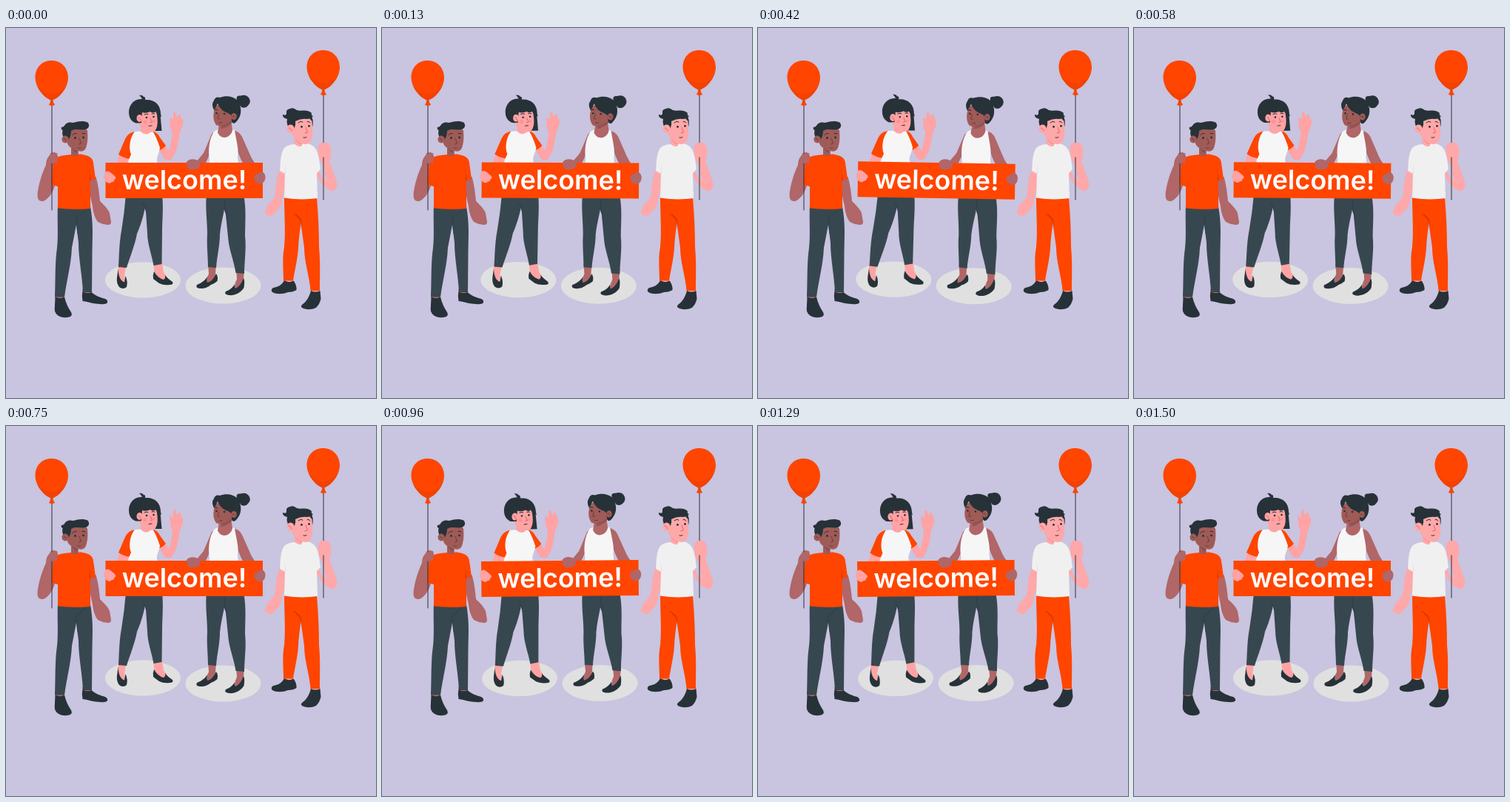
An HTML page that plays this animation: 500x500 px, repeating every 1.54 s.

```html
<!DOCTYPE html>
<html lang="en">
<head>
<meta charset="utf-8">
<title>Welcome</title>
<style>
  html, body { margin: 0; width: 100%; height: 100%; overflow: hidden; background: #c9c4df; }
  svg { display: block; width: 100%; height: 100%; }
  .orange { fill: #ff4500; }
  .ink { fill: #263238; }
  .slate { fill: #37474f; }
  .pink { fill: #ffa3a4; }
  .rose { fill: #ffa8a9; }
  .brown { fill: #9f5b57; }
  .tan { fill: #b16668; }
  .white { fill: #f6f6f6; }
  .pale { fill: #f0f0f0; }
  .shadow { fill: #e0e0e0; }
  .shade { fill: #000; opacity: .16; }
  .tint { fill: #000; opacity: .05; }
  .line { fill: none; stroke: #263238; stroke-width: 1; stroke-linecap: round; }
  .crease { fill: none; stroke: #263238; stroke-width: .8; opacity: .55; }
  .nose { fill: none; stroke: #ed6068; stroke-width: 1; stroke-linecap: round; }
  .dusk { fill: none; stroke: #6f3b3b; stroke-width: 1; stroke-linecap: round; }
  .blush { fill: #ff6b76; opacity: .3; }
  text { font: 600 36px Inter, "Open Sans", sans-serif; fill: #fff; text-anchor: middle; }
</style>
</head>
<body>
<svg viewBox="0 0 500 500">
  <defs>
    <g id="balloon">
      <path class="line" d="M62 103V246"/>
      <path class="orange" d="M61.500 44C75 44 84 54 84 67C84 81 72 95 62.500 97.500L66 104Q62 106 58 104L61 97.500C52 95 39.500 81 39.500 67C39.500 54 48 44 61.500 44Z"/>
      <path class="tint" d="M41 76C52 93 73 93 83 75C79 87 70 95 62.500 97.500H61C53 95 44 86 41 76Z"/>
      <path class="shade" d="M59 97Q62 98 65 96.500L64 99.500H60Z"/>
    </g>
  </defs>

  <!-- man on the left -->
  <g>
    <path class="tan" d="M103 353H116L115.500 360H104ZM66.500 360H79V368H67Z"/>
    <path class="ink" d="M103.500 356Q109 360 115.500 357C121 362 127 364 134 366Q138 368 137 371Q135 374 127 373C118 373 112 370 103.500 369Q102 362 103.500 356Z"/>
    <path class="ink" d="M66.500 363.500Q73 367 79 363.500C81 372 84 378 88 384Q91 390 83 391Q76 392 71 389C64 384 66 379 66 374Z"/>
    <path class="slate" d="M84 241H114C118 264 117 280 116.500 300L116 357H104C103 334 98 312 98 290L94 258Z"/>
    <path class="slate" d="M70 238H113L97 256C94 270 92 282 89 297C88 320 82 340 79 363.500H66C67 340 66 318 69 297C71 280 69 258 70 238Z"/>
    <path class="crease" d="M106 246Q101 254 94.500 257L97 279"/>
    <path class="tan" d="M112 203L121.500 201C125 213 126 224 127 234C132 239 137 243 140 250L142 262Q142 266 138 266L131 265L124 262Q118 254 117 241C114 229 112 217 112 203Z"/>
    <path class="orange" d="M89 171L101 170.500C112 172 117 175 118 182L121 204L114 206V244Q92 246 70 243.500V214L62 212C62 197 62 184 67 176Q71 172 89 171Z"/>
    <path class="shade" d="M112.500 188L114.500 206L113 207Z"/>
    <path class="tan" d="M59 172Q60 168 65 168Q70 169 70 174L69 182L65 198L62 212L66 213C63 223 57 232 50 234Q42 235 42.500 225C44 210 49 196 54 185Q54 177 59 172Z"/>
    <path class="orange" d="M65 181C62 191 62 202 61.500 212L71 214L73 185Z"/>
    <path class="brown" d="M82 139C89 132 106 131 110 139C111 149 110 158 107 164Q104 168 97 166L98 171Q94 176 88 171.500V162C82 159 80 149 82 139Z"/>
    <path class="shade" d="M89 162Q93 166 97.500 166L97.500 169Q92 168 89 162Z"/>
    <path class="ink" d="M80 152Q75 145 76.500 138Q74 137 75 134Q78 134 79 132Q82 126 91 128C98 126 105 125 111 128Q114 134 109 136.500C102 139 95 135 88 139Q88 146 85 150Z"/>
    <ellipse class="brown" cx="80" cy="150.500" rx="4.600" ry="5"/>
    <path class="dusk" d="M78 149Q80 149 81 152M99 149L101.500 156L98.500 157M97 162H101"/>
    <circle class="ink" cx="93.500" cy="148.500" r="1.400"/>
    <circle class="ink" cx="104.500" cy="148" r="1.400"/>
    <path class="line" d="M90 144.500Q92 142 95 142.500M103 142.500Q105 141.500 107 143"/>
  </g>
  <use href="#balloon"/>
  <path class="tan" d="M58 174Q62 168 69 169Q70 172 67 175L68 181Q64 184 58 182Z"/>

  <!-- man on the right -->
  <g>
    <path class="rose" d="M376 337H388V346H376ZM411.500 350H424V360H412Z"/>
    <path class="ink" d="M376 341Q382 345 388.500 341.500Q393 347 392.500 354Q388 357 381 357C374 360 365 360 360 357Q357 354 361 351C368 350 373 347 376 341Z"/>
    <path class="ink" d="M412 355Q418 358 424.500 355L425.500 366Q424 373 419 378Q411 382 402 379Q397 377 400 374C406 370 410 363 412 355Z"/>
    <path class="orange" d="M376 229H405C400 255 396 276 395 297C394 313 390 328 388 341.500H375C375 326 373 311 376 296C378 275 376 252 376 229Z"/>
    <path class="orange" d="M382 229H420C422 253 423 275 423 296C425 317 424 336 424 355H411.500C410 334 403 317 403 297L397 253Z"/>
    <path class="shade" d="M388 250Q395 252 399 259L400 274L397 259Z"/>
    <path class="rose" d="M370 190L381 193C380 207 377 219 373 230Q373 240 367 246L360 253Q355 256 350 250Q349 247 352 244Q351 241 355 238L363 229C364 215 366 202 370 190Z"/>
    <path class="rose" d="M420 190L430 207L432 205L428 184Q421 176 422 163Q423 156 427 155Q435 153 438 160Q441 169 437 180L447 208Q449 219 441 220Q430 220 417 193Z"/>
    <path class="pale" d="M389 157L407 156C417 158 421 165 423 177L425 191L420 196L421 230Q399 233 376 229.500L377 197L370 193C371 180 371 169 376 162Q380 158 389 157Z"/>
    <path class="tint" d="M377 184L378.500 197L376.500 197Z"/>
    <path class="rose" d="M386 121C395 117 409 118 413 125C415 137 415 148 411 154Q407 159 400 156L400 159Q397 162 390 157V149C384 143 383 131 386 121Z"/>
    <path class="blush" d="M391 149Q395 155 400 156V158Q392 156 391 149Z"/>
    <path class="ink" d="M385 139Q378 130 380 123Q373 121 374 117Q379 119 379 115Q378 110 384 109Q388 107 393 111C400 113 407 109 413 115Q412 118 415 119Q412 123 406 123Q399 122 391 126Q392 133 388 137Z"/>
    <path class="ink" d="M409 121L413.500 126L414 134Q416 125 413 120Z"/>
    <ellipse class="rose" cx="384.500" cy="136" rx="5" ry="5.500"/>
    <path class="nose" d="M382 135Q385 135 386 139M405 134L407.500 141L404 142"/>
    <path class="line" d="M402 148Q404 149 406 147.500M395 128Q398 125 401 127M407 126.500Q409 125.500 411 128"/>
    <circle class="ink" cx="399.500" cy="133.500" r="1.400"/>
    <circle class="ink" cx="409.500" cy="132.500" r="1.400"/>
  </g>
  <use href="#balloon" x="367" y="-14"/>
  <path class="rose" d="M422 160Q427 153 434 156Q438 159 437 162L432 165L436 171Q433 176 427 174L423 169Z"/>

  <g id="group">
    <ellipse class="shadow" cx="185" cy="340.500" rx="51" ry="24.200"/>
    <ellipse class="shadow" cx="293.500" cy="348" rx="51" ry="24.500"/>

    <!-- woman with the bob -->
    <g>
      <path class="pink" d="M152 318H163L160 334L162 346H153L151 331ZM199 315H210.500L213 330L221 342L210 344L201 337Z"/>
      <path class="ink" d="M151.500 326C152 336 155 342 160 343.500Q161 338 161.500 335Q165 343 163 350Q158 354 153 350Q149 345 150 337Z"/>
      <path class="ink" d="M200 329Q205 338 213 340Q216 338 215 334C218 338 221 340 225 343Q227 347 221 347Q213 348 207 345L199 339Q198 334 200 329Z"/>
      <path class="slate" d="M162 225H191C188 246 184 262 177 278C174 294 168 308 163 324L152 323C153 306 153 290 156 274Q160 250 162 225Z"/>
      <path class="slate" d="M181 225H211C213 244 211 260 211 277L210.500 319L199.500 321C197 306 191 292 191 277L189 248Z"/>
      <path class="crease" d="M184 236Q188 240 190 250"/>
      <path class="pink" d="M154 169L168 174Q164 184 157 190L141 202L135 196L149 185Z"/>
      <path class="pink" d="M205 160L214 158L220 166C223 157 224 149 225 141Q221 134 222 128Q220 123 223 121L226 125L226 116Q227 112 229 114L231 120L234 117Q237 116 236 121L238 123Q241 128 237 136L234 144C233 157 230 169 224 177Q218 181 213 175Z"/>
      <path class="orange" d="M175 140Q165 141 161 150L152 171Q159 176 168 177L176 160ZM197 139Q205 141 208 148L216 159Q212 164 205 166L197 156Z"/>
      <path class="white" d="M174 140L198 139C202 145 206 155 208 162C207 169 203 174 204 180L205 186H164Q165 178 169 171C165 161 168 147 174 140Z"/>
      <path class="pink" d="M183 130L195 136L196 140Q190 147 182 140Z"/>
      <path class="ink" d="M197 112L208 111L210.500 139H200Z"/>
      <path class="pink" d="M180 112H203C205 122 206 132 202 138Q199 142 191 140Q181 137 180 128Z"/>
      <path class="ink" d="M184 96Q182 92 180 91Q184 90 186 93Q189 93 188 97C201 96 209 104 209 116L210 120Q205 118 202 113Q199 116 195 113Q189 116 184 114L183 128Q178 129 174 128Q166 124 166 114C166 104 173 95 184 96Z"/>
      <ellipse class="pink" cx="180.500" cy="122" rx="4" ry="5"/>
      <circle class="ink" cx="190" cy="121" r="1.300"/>
      <circle class="ink" cx="199.500" cy="120" r="1.300"/>
      <path class="line" d="M187 117Q189 115.500 192 116.500M197 116Q199 115 201 116M193 132.500Q195 132 197 132"/>
      <path class="nose" d="M195 122L197.500 127L195 128M179 121Q181 121 182 125"/>
      <circle class="blush" cx="188" cy="127" r="2.500"/>
      <circle class="blush" cx="200" cy="126" r="2"/>
    </g>

    <!-- woman with the bun -->
    <g>
      <path class="tan" d="M273 318H284L283 333L281 345L269 348L274 332ZM311 325H322L321 340V350L306 357L312 339Z"/>
      <path class="ink" d="M274 333Q270 341 272 344Q279 343 284 332Q287 336 285.500 342Q281 346 277 347Q271 352 264 352Q255 352 258 347C266 344 271 339 274 333Z"/>
      <path class="ink" d="M311 341Q307 349 310 352Q317 349 321 338Q323 341 321.500 351C317 358 309 362 301 361Q294 360 297 356C305 353 309 348 311 341Z"/>
      <path class="slate" d="M271 225H298C296 246 291 260 289 279C289 294 285 309 284 324L273 323C273 308 271 294 272 279C272 260 269 243 271 225Z"/>
      <path class="slate" d="M288 225H321C325 244 323 264 323 281C325 298 322 315 322 332L310.500 331C308 314 301 299 300 282L297 252Z"/>
      <path class="crease" d="M295 230Q295 242 298 252L299 259"/>
      <path class="tan" d="M278 143Q283 139 286 146L279 163L270 182L260 188L257 181L267 169Z"/>
      <path class="tan" d="M306 138Q315 139 319 147L331 174Q335 182 345 194L340 202L322 186C315 174 309 158 306 138Z"/>
      <path class="white" d="M282 139Q287 136 290 138L304 137L309 138C311 152 315 164 313 173L314 188H274L275 178C273 167 274 149 282 139Z"/>
      <path class="tan" d="M288 130L304 123L306 138C304 149 290 152 286 141Z"/>
      <path class="brown" d="M282 108C289 98 307 99 312 110C313 121 307 129 299 131Q290 134 284 131C279 124 280 116 282 108Z"/>
      <path class="shade" d="M291 132Q300 131 304 126V129Q299 135 290 136Z"/>
      <path class="ink" d="M312 97Q310 91 317 91.500Q324 89 328 94Q332 100 327 105Q324 109 318 107L316 104C319 113 317 121 310 128Q304 131 305 121Q305 117 300 115Q290 112 286 102Q284 107 281 111Q277 103 281 98Q283 92 289 94C297 91 306 92 312 97Z"/>
      <ellipse class="brown" cx="308" cy="119.500" rx="3.800" ry="4.600"/>
      <path class="dusk" d="M287.500 116L286 122L288.500 123M288 128H292M306 119Q308 118 309 121"/>
      <circle class="ink" cx="284.500" cy="115" r="1.300"/>
      <circle class="ink" cx="295" cy="116" r="1.300"/>
      <path class="line" d="M282 110.500Q284 109 286 111M293 111Q296 110 298 112.500"/>
    </g>

    <path class="orange" d="M134.500 182H347V230H134.500Z"/>
    <text x="241" y="218">welcome!</text>
    <path class="pink" d="M134 195Q137 192 141 195L147 200Q150 204 146 205Q147 208 143 208Q141 211 137 209Q132 206 132 201Z"/>
    <path class="tan" d="M263 181L257 178Q250 176 246 179Q242 182 245 185Q243 189 247 190Q249 193 253 191Q258 192 262 187Z"/>
    <path class="tan" d="M344 194Q349 194 350.500 200Q351 207 346 210Q342 212 340 209Q336 209 337 206Q333 204 336 201Q335 198 340 197Z"/>
  </g>
</svg>
<script>
  const group = document.getElementById("group");
  const LOOP = 1540, STEP = 1000 / 24, CYCLE = 36;

  // Linear sway: 0 to 1 degree, to -1, back to 0, advancing 24 times a second.
  function sway(time) {
    const step = Math.floor((time % LOOP + 4) / STEP);
    const phase = step % CYCLE / CYCLE;
    return phase < .25 ? 4 * phase : phase < .75 ? 2 - 4 * phase : 4 * phase - 4;
  }

  const start = performance.now();
  function draw() {
    const angle = sway(performance.now() - start);
    group.setAttribute("transform", `rotate(${angle} 241 231)`);
    requestAnimationFrame(draw);
  }
  draw();
</script>
</body>
</html>
```
